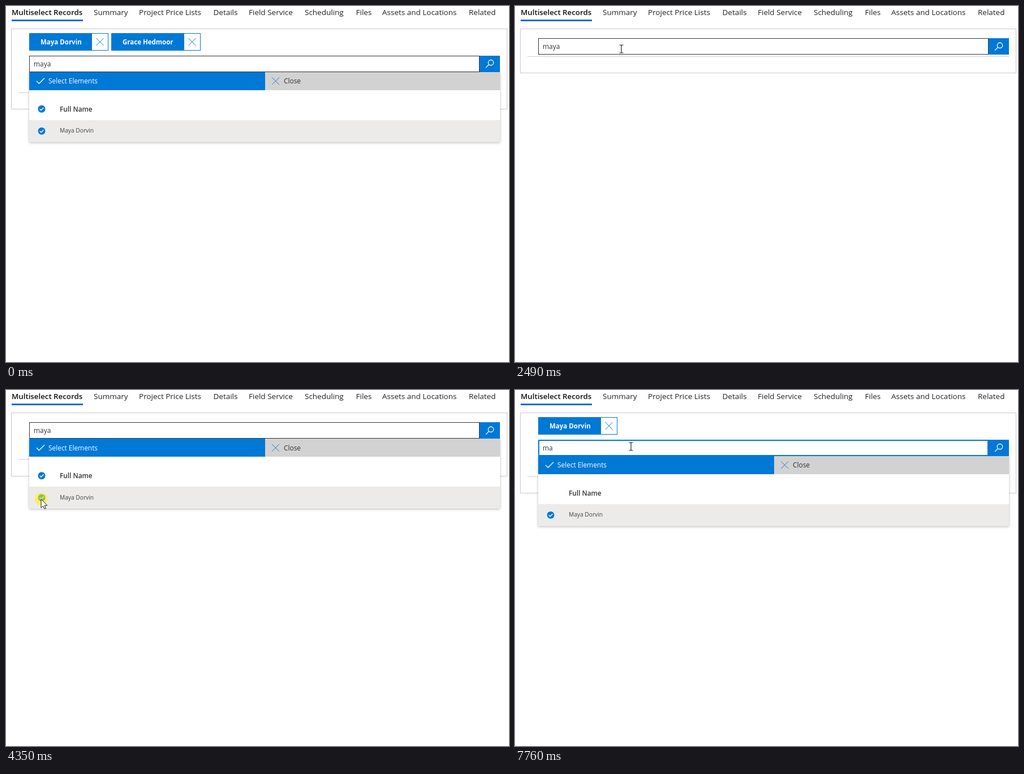
These frames come from a looping animation (889x630 px, 8 s). An HTML page:

```html
<!DOCTYPE html>
<html lang="en">
<head>
<meta charset="utf-8">
<title>Multiselect Records</title>
<style>
  html, body { margin: 0; width: 100%; height: 100%; overflow: hidden; background: #fff; }
  svg { display: block; font: 11.9px "Open Sans", "Noto Sans", sans-serif; fill: #333; }
  rect { shape-rendering: crispEdges; }
  .nav { font-size: 13.5px; fill: #222; }
  .nav.on { font-size: 13.3px; font-weight: 600; fill: #111; }
  .chip { font-size: 11.5px; font-weight: 700; fill: #fff; }
  .head { font-size: 11.8px; font-weight: 600; }
  .row { font-size: 10.2px; fill: #444; }
  .shadow { filter: drop-shadow(0 1px 2px rgba(0, 0, 0, .28)); }
</style>
</head>
<body>
<svg id="stage" width="889" height="630" viewBox="0 0 889 630"></svg>
<script>
const LOOP = 8000, BLUE = '#0078d6', CHIP_SHIFT = 30.5;
const stage = document.getElementById('stage');

const TABS = [['Multiselect Records', 10], ['Summary', 155], ['Project Price Lists', 235],
  ['Details', 366.5], ['Field Service', 429], ['Scheduling', 528], ['Files', 618.5],
  ['Assets and Locations', 665], ['Related', 818]];
const MAYA = { name: 'Maya Dorvin', width: 110 };
const GRACE = { name: 'Grace Hedmoor', width: 128 };

// Pointer path: time, x, y
const PATH = [[70, 260, 531], [480, 168, 103], [1019, 168, 103], [1020, 168, 90], [1110, 167, 70],
  [1400, 169, 69], [1720, 169, 69], [1880, 186, 66], [2260, 186, 66], [2420, 188, 76],
  [2490, 188, 76], [2950, 853, 80], [3481, 853, 80], [4120, 62, 193], [4400, 62, 193],
  [4900, 206, 104], [5519, 206, 104], [5520, 207, 103], [5749, 207, 103], [5750, 205, 101],
  [6299, 205, 101], [6300, 205, 100]];
const POINTERS = [[70, 'arrow'], [440, 'beam'], [1050, 'hand'], [2190, 'beam'], [2925, 'hand'],
  [3730, 'arrow'], [4800, 'hand'], [5290, 'beam']];
const CLICKS = [[560, 630], [700, 770], [1120, 1260], [2030, 2170], [3050, 3190],
  [4270, 4420], [5200, 5320], [5900, 5970], [6040, 6110]];

const within = (t, from, to) => t >= from && t < to;
const rect = (x, y, w, h, fill, more = '') =>
  `<rect x="${x}" y="${y}" width="${w}" height="${h}" fill="${fill}" ${more}/>`;
const text = (x, y, str, more = '') => `<text x="${x}" y="${y}" ${more}>${str}</text>`;
const line = (d, color, width = 1) =>
  `<path d="${d}" fill="none" stroke="${color}" stroke-width="${width}"/>`;
const cross = (x, y, color) => line(`M${x - 6.5} ${y - 6.5}l13 13m0-13l-13 13`, color);
const tick = (x, y, color) => line(`M${x - 7} ${y}l4.5 4.5 9.5-9.5`, color, 1.3);
const badge = y => `<circle cx="63" cy="${y}" r="7" fill="${BLUE}" stroke="#fff"/>` +
  line(`M59.7 ${y}l2.4 2.4 4.4-4.5`, '#fff', 1.4);

function pointerAt(t) {
  const i = PATH.findIndex(p => p[0] > t);
  if (i < 0) return PATH[PATH.length - 1].slice(1);
  const [t0, x0, y0] = PATH[i - 1], [t1, x1, y1] = PATH[i];
  const u = (t - t0) / (t1 - t0), s = u * u * (3 - 2 * u);
  return [x0 + (x1 - x0) * s, y0 + (y1 - y0) * s];
}

const SHAPES = {
  arrow: '<path d="M0 0v15.5l3.6-3.3 2.5 5.3 2.4-1.1-2.5-5.1h4.8z" fill="#fff" stroke="#222"/>',
  beam: line('M-3.5-7h2.5l1 1 1-1h2.5M0-6v12M-3.5 7h2.5l1-1 1 1h2.5', '#222', 1.2),
  hand: '<path d="M-1.5 1q0-1.5 1.5-1.5t1.5 1.5v6q1.2-.8 2.3.5 1.5-.8 2.5.7 2-.6 2.5 1.5v4l-1.6 3v3h-7.5v-2.5l-4.7-6q-.6-2 1.3-2l2.2 2z" fill="#fff" stroke="#222"/>' +
    line('M1.5 7v3.5M4 8v3M6.5 9v2.5', '#222')
};

function pointer(t) {
  if (t < 70) return '';
  const [x, y] = pointerAt(t);
  const kind = POINTERS.filter(p => p[0] <= t).pop()[1];
  const halo = CLICKS.some(c => within(t, ...c)) ? '<circle r="11" fill="#fff200" opacity=".58"/>' : '';
  return `<g transform="translate(${x} ${y})">${halo}${SHAPES[kind]}</g>`;
}

function chips(list) {
  let x = 41;
  return list.map(({ name, width }) => {
    const out = rect(x, 48, width + 30, 31, BLUE) + rect(x + width + 1, 49, 28, 29, '#fff') +
      text(x + 20, 68, name, 'class="chip"') + cross(x + width + 15, 63.5, BLUE);
    x += width + 35;
    return out;
  }).join('');
}

function searchBox(t) {
  const focus = within(t, 560, 1180) || t >= 5900;
  const selected = within(t, 700, 1180) || within(t, 6060, 7000);
  const value = 'maya'.slice(0, t < 7000 ? 4 : t < 7210 ? 1 : 2);
  const caret = focus && !selected && t < 7760;
  const caretX = { 1: 60.5, 2: 67, 4: 79.8 }[value.length];
  return rect(41, 57.3, 796, 29, focus ? BLUE : '#333') +
    (focus ? rect(43, 59.3, 792, 25, '#fff') : rect(42, 58.3, 794, 27, '#fff')) +
    (selected ? rect(49, 63.3, 30, 17, '#2f8cf0') : '') +
    text(49, 76, value, selected ? 'fill="#fff"' : '') +
    (caret ? rect(caretX, 63.3, 1, 16, '#111') : '') +
    rect(837, 57.3, 36, 29, BLUE) +
    '<circle cx="857" cy="69.7" r="4.7" fill="none" stroke="#fff" stroke-width="1.3"/>' +
    line('M853.6 73l-5.6 5.6', '#fff', 1.3);
}

function dropdown(t) {
  const rowChecked = t < 1180 || t >= 4300;
  const allChecked = t < 1180 || within(t, 4300, 5275);
  const overSelect = within(t, 4800, 5275);
  const overClose = within(t, 3565, 3790);
  const overRow = within(t, 3940, 4300);
  const fade = within(t, 3500, 3900) ? (t - 3500) / 400 : 1;
  const ink = overSelect ? '#333' : '#fff';
  const rowFill = rowChecked ? '#ecebe9' : overRow ? '#f3f2f1' : '#fff';
  return rect(41, 85.9, 832, 124.3, '#fff', 'class="shadow"') +
    rect(41, 85.9, 416.5, 32.4, overSelect ? '#ecebe7' : BLUE) +
    tick(61, 102.3, overSelect ? '#2b6cb0' : '#fff') +
    text(75, 106.5, 'Select Elements', `fill="${ink}"`) +
    rect(457.5, 85.9, 415.5, 32.4, overClose ? '#f3f2f1' : '#d2d2d2') +
    cross(476.5, 102.3, overClose ? '#666' : '#2f74c0') +
    text(491, 106.5, 'Close') +
    text(95, 156, 'Full Name', 'class="head"') +
    rect(41, 171.3, 832, 38.9, rowFill) +
    (rowChecked ? '' : rect(41, 171.3, 832, 1, '#edebe9')) +
    text(95, 193.8, MAYA.name, `class="row" opacity="${fade}"`) +
    (allChecked ? badge(151.7) : '') +
    (rowChecked ? badge(190.8) : '') +
    (overRow ? '<circle cx="63" cy="190.8" r="6.5" fill="none" stroke="#888"/>' : '');
}

function scene(t) {
  const list = t < 1180 ? [MAYA, GRACE] : t < 2180 ? [GRACE] : t < 5275 ? [] : [MAYA];
  const open = t < 1180 || t >= 3500;
  const shift = list.length ? CHIP_SHIFT : 0;
  const tabs = TABS.map(([name, x], i) => text(x, 16, name, `class="nav ${i ? '' : 'on'}"`)).join('');
  return tabs + rect(10, 24, 126, 3, '#2266e3', 'rx="1"') +
    rect(9.5, 40.5, 876, (open ? 111.8 : 78.3) + shift, '#fff', 'stroke="#c8c8c8"') +
    chips(list) +
    `<g transform="translate(0 ${shift})">` +
    rect(22, open ? 122.3 : 89.3, 851, 1, '#d2d2d2') +
    (open ? dropdown(t) : '') + searchBox(t) + '</g>' +
    pointer(t);
}

function draw() {
  stage.innerHTML = scene(performance.now() % LOOP);
  requestAnimationFrame(draw);
}
draw();
</script>
</body>
</html>
```
